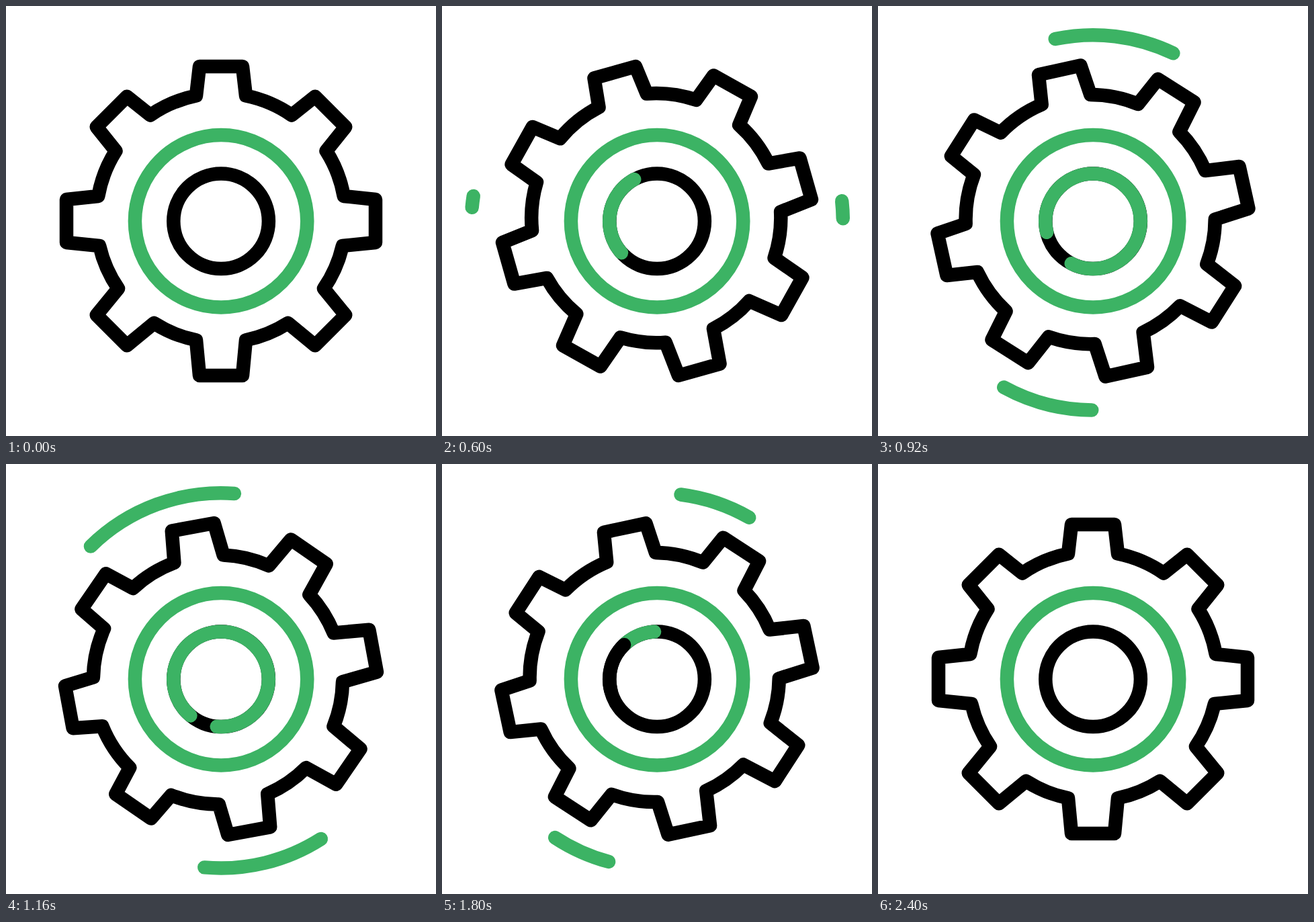
An HTML page that plays this animation: 640x640 px, repeating every 2480 ms.

```html
<!DOCTYPE html>
<html lang="en">
<head>
<meta charset="utf-8">
<title>Turning gear</title>
<style>
  html, body { margin: 0; width: 100%; height: 100%; overflow: hidden; background: #fff; }
  svg { display: block; width: 100%; height: 100%; }
  path, circle { fill: none; stroke-width: 20.5; stroke-linecap: round; stroke-linejoin: round; }
  .ink { stroke: #000; }
  .leaf { stroke: #3cb364; }
</style>
</head>
<body>
<svg viewBox="0 0 640 640">
  <path id="gear" class="ink"/>
  <circle class="leaf" cx="320.1" cy="320.3" r="128.2"/>
  <circle class="ink" cx="320.1" cy="320.3" r="70.8"/>
  <path id="ring" class="leaf"/>
  <path id="wipe" class="ink"/>
  <path id="upper" class="leaf"/>
  <path id="lower" class="leaf"/>
</svg>
<script>
const LOOP = 2480, STEP = 40, LAST = 2400, MID = 320;
const el = id => document.getElementById(id);
const set = (id, d) => el(id).setAttribute('d', d);
const rad = deg => deg * Math.PI / 180;

// Eight equal teeth on a body circle that sits slightly above the centre.
function outline() {
  const body = 185.6, lift = 4.6, tip = 230, tipHalf = 32, foot = 37;
  let d = '';
  for (let k = 0; k < 8; k++) {
    const c = Math.cos(rad(45 * k)), s = Math.sin(rad(45 * k));
    const at = (x, y) => (MID + x * c + y * s).toFixed(2) + ' ' + (MID + x * s - y * c).toFixed(2);
    const base = x => at(x, lift * c + Math.sqrt(body ** 2 - (x + lift * s) ** 2));
    d += (k ? `A${body} ${body} 0 0 1 ` : 'M') + base(-foot) +
      `L${at(-tipHalf, tip)}L${at(tipHalf, tip)}L${base(foot)}`;
  }
  return d + `A${body} ${body} 0 0 1 ` + d.slice(1, d.indexOf('L')) + 'Z';
}

// S-curve from 0 to 1 that is half way at u = mid; pow sets the steepness.
function ease(u, mid, pow) {
  if (u <= 0) return 0;
  if (u >= 1) return 1;
  return 1 / (1 + ((1 - u) / u * mid / (1 - mid)) ** pow);
}

// Rises from 0 at start to size at peak, and is back at 0 at end.
const swing = (size, [start, peak, end], rise, fall) => t => size * (t < peak
  ? ease((t - start) / (peak - start), ...rise)
  : 1 - ease((t - peak) / (end - peak), ...fall));

const turn = swing(109, [0, 1280, 2400], [0.706, 1.77], [0.475, 2.13]);
const ringHead = swing(500, [0, 1200, 2080], [0.585, 3], [0.305, 1.48]);
const ringTail = swing(175, [0, 1200, 2080], [0.633, 3], [0.235, 2.05]);
const upHead = swing(138, [540, 1280, 2080], [0.361, 1.65], [0.71, 1.45]);
const upTail = swing(88, [580, 1280, 2070], [0.339, 1.65], [0.777, 1.31]);
const lowHead = swing(135, [540, 1280, 2080], [0.373, 1.78], [0.728, 1.41]);
const lowTail = t => 1.1 * upTail(t);

// Counterclockwise arc that begins at base, in degrees from the right.
function arc(cy, r, base, from, to) {
  if (to - from < 0.3) return '';
  const at = deg => (MID + r * Math.cos(rad(base + deg))).toFixed(2) + ' ' +
    (cy - r * Math.sin(rad(base + deg))).toFixed(2);
  return `M${at(from)}A${r} ${r} 0 ${to - from > 180 ? 1 : 0} 0 ${at(to)}`;
}

function draw(t) {
  el('gear').setAttribute('transform', `rotate(${-turn(t)} ${MID} ${MID})`);

  const head = ringHead(t), tail = ringTail(t);
  set('ring', arc(320.3, 70.8, 90, tail, head));
  // On the way back black closes over the leading end.
  set('wipe', t > 1640 && head > tail ? arc(320.3, 70.8, 90, head, head + 60) : '');

  set('upper', arc(320, 276.8, 0, upTail(t), upHead(t)));
  set('lower', arc(325, 276.5, 170.4, lowTail(t), lowHead(t)));
}

set('gear', outline());
const start = performance.now();
function tick() {
  const t = (performance.now() - start) % LOOP;
  draw(Math.min(LAST, Math.floor(t / STEP) * STEP));
  requestAnimationFrame(tick);
}
tick();
</script>
</body>
</html>
```
